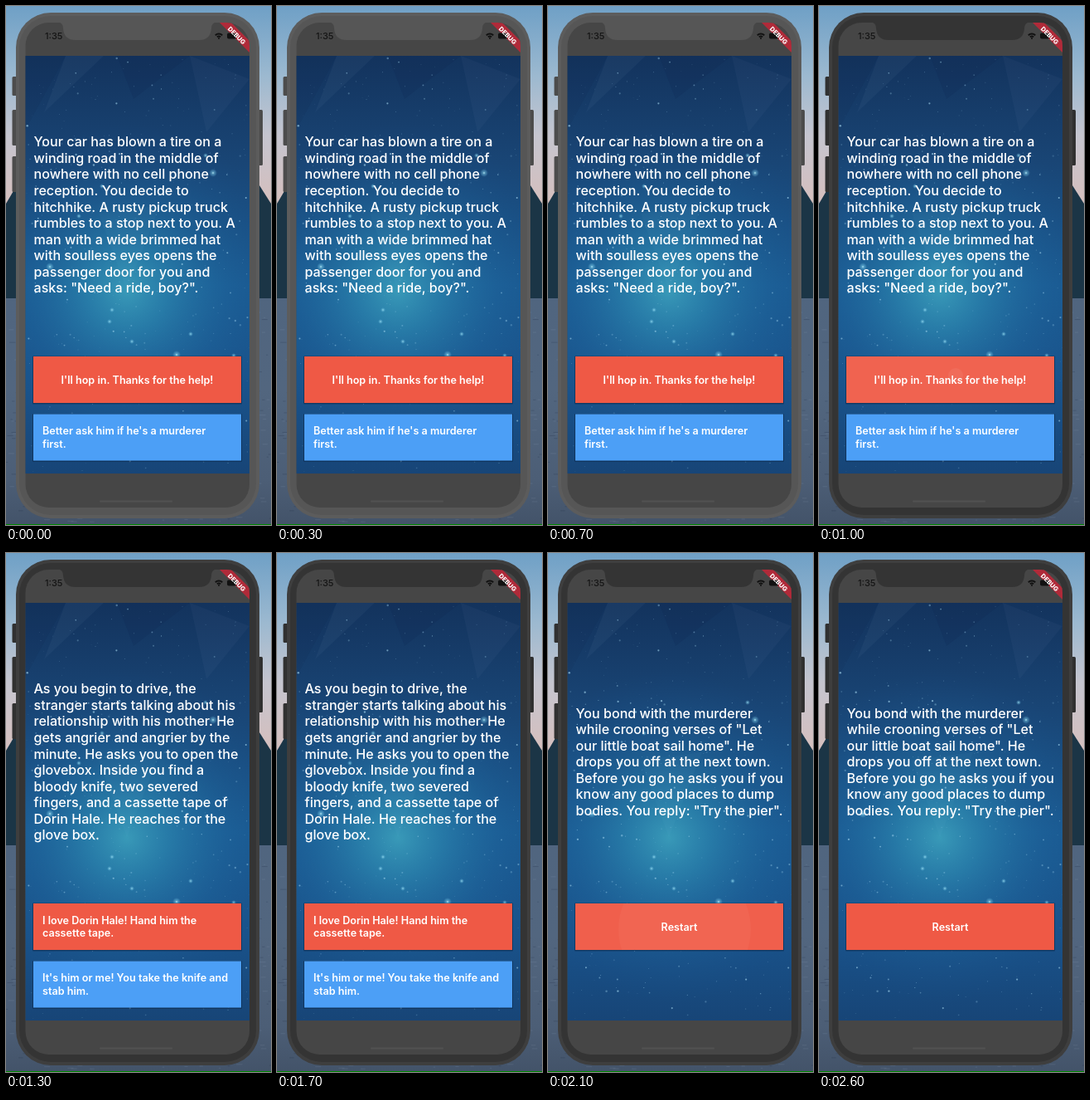
These frames come from a looping animation (320 px wide and 625 px high, 2.7 s). An HTML page with a canvas:

```html
<!DOCTYPE html>
<html lang="en">
<head>
<meta charset="utf-8">
<title>Story choices</title>
<style>
html, body { margin: 0; width: 100%; height: 100%; overflow: hidden; background: #111; }
canvas { display: block; }
</style>
</head>
<body>
<canvas id="stage" width="320" height="625"></canvas>
<script>
const ctx = document.getElementById('stage').getContext('2d');
const LOOP = 2700, STEP = 100;
const FOCUS_AT = 800;
const TAPS = [{ at: 1000, x: 165, y: 445 }, { at: 2000, x: 165, y: 453 }];
const FONT = 'Inter, Roboto, sans-serif';

const SCENES = [
  {
    from: 0,
    story: ['Your car has blown a tire on a', 'winding road in the middle of',
      'nowhere with no cell phone', 'reception. You decide to',
      'hitchhike. A rusty pickup truck', 'rumbles to a stop next to you. A',
      'man with a wide brimmed hat', 'with soulless eyes opens the',
      'passenger door for you and', 'asks: "Need a ride, boy?".'],
    choices: [["I'll hop in. Thanks for the help!"],
      ["Better ask him if he's a murderer", 'first.']]
  },
  {
    from: 1100,
    story: ['As you begin to drive, the', 'stranger starts talking about his',
      'relationship with his mother. He', 'gets angrier and angrier by the',
      'minute. He asks you to open the', 'glovebox. Inside you find a',
      'bloody knife, two severed', 'fingers, and a cassette tape of',
      'Dorin Hale. He reaches for the', 'glove box.'],
    choices: [['I love Dorin Hale! Hand him the', 'cassette tape.'],
      ["It's him or me! You take the knife and", 'stab him.']]
  },
  {
    from: 2100,
    story: ['You bond with the murderer', 'while crooning verses of "Let',
      'our little boat sail home". He', 'drops you off at the next town.',
      'Before you go he asks you if you', 'know any good places to dump',
      'bodies. You reply: "Try the pier".'],
    choices: [['Restart']]
  }
];

const BUTTONS = [
  { y: 422, h: 56, color: '#ef5945' },
  { y: 491.5, h: 56, color: '#4c9ff6' }
];

function seeded(seed) {
  return () => {
    seed = (seed * 1664525 + 1013904223) >>> 0;
    return seed / 4294967296;
  };
}

function fillRect(g, color, x, y, w, h) {
  g.fillStyle = color;
  g.fillRect(x, y, w, h);
}

function fillRound(g, color, x, y, w, h, r) {
  g.fillStyle = color;
  g.beginPath();
  g.roundRect(x, y, w, h, r);
  g.fill();
}

function polygon(g, color, ...points) {
  g.fillStyle = color;
  g.beginPath();
  points.forEach(([x, y]) => g.lineTo(x, y));
  g.fill();
}

function disc(g, color, x, y, r) {
  g.fillStyle = color;
  g.beginPath();
  g.arc(x, y, r, 0, Math.PI * 2);
  g.fill();
}

function withStops(gradient, ...stops) {
  stops.forEach(([at, color]) => gradient.addColorStop(at, color));
  return gradient;
}

function label(g, text, x, y, font, align = 'left', color = '#fff') {
  g.font = `${font} ${FONT}`;
  g.textAlign = align;
  g.textBaseline = 'alphabetic';
  g.fillStyle = color;
  g.fillText(text, x, y);
}

function drawDesktop(g) {
  fillRect(g, withStops(g.createLinearGradient(0, 0, 0, 240),
    [0, '#6fa0c6'], [0.35, '#9cb9d0'], [0.65, '#c5c5cf'], [1, '#d6bfbd']), 0, 0, 320, 240);
  polygon(g, '#1b3546', [0, 238], [13, 216], [306, 216], [320, 238], [320, 354], [0, 354]);
  fillRect(g, withStops(g.createLinearGradient(0, 352, 0, 625),
    [0, '#50657f'], [0.4, '#52667f'], [0.8, '#4c5e76'], [1, '#435369']), 0, 352, 320, 273);
  const rand = seeded(9);
  for (let i = 0; i < 420; i++) {
    const y = 356 + rand() * 266;
    fillRect(g, rand() < 0.5 ? 'rgba(20,32,50,.18)' : 'rgba(170,190,215,.12)',
      rand() * 320, y, 2 + rand() * 6, 1);
  }
  fillRect(g, '#008700', 0, 624, 320, 1);
}

function drawSpace(g) {
  g.save();
  g.beginPath();
  g.rect(23.5, 60, 270.5, 503);
  g.clip();
  fillRect(g, withStops(g.createLinearGradient(0, 60, 0, 563),
    [0, '#13335d'], [0.25, '#194575'], [0.55, '#1a5a92'], [0.8, '#19528a'], [1, '#174577']), 23, 60, 272, 503);
  fillRect(g, withStops(g.createRadialGradient(146, 343, 0, 146, 343, 200),
    [0, 'rgba(60,160,188,.9)'], [0.25, 'rgba(45,138,178,.68)'], [0.6, 'rgba(33,108,162,.32)'],
    [1, 'rgba(24,80,140,0)']), 23, 60, 272, 503);

  polygon(g, 'rgba(130,160,195,.06)', [72, 60], [118, 60], [46, 128]);
  polygon(g, 'rgba(10,30,70,.12)', [134, 60], [222, 60], [154, 112]);
  polygon(g, 'rgba(130,160,195,.05)', [222, 60], [294, 88], [242, 152]);
  polygon(g, 'rgba(10,30,70,.1)', [23, 60], [72, 60], [23, 150]);
  polygon(g, 'rgba(120,190,220,.04)', [146, 343], [112, 250], [186, 240]);

  const rand = seeded(41);
  for (let i = 0; i < 380; i++) {
    const x = 24 + rand() * 270, y = 61 + rand() * 500;
    disc(g, `rgba(165,215,240,${0.15 + rand() * 0.5})`, x, y, 0.35 + rand() ** 3 * 0.9);
  }
  const bright = [[250, 201], [53, 314], [206, 420], [223, 395], [128, 366], [116, 217],
    [88, 253], [125, 380], [152, 404], [275, 421], [241, 180]];
  bright.forEach(([x, y], i) => {
    const r = i < 3 ? 5 : 3;
    disc(g, withStops(g.createRadialGradient(x, y, 0, x, y, r),
      [0, 'rgba(205,245,255,.95)'], [0.3, 'rgba(135,215,240,.5)'], [1, 'rgba(120,200,235,0)']), x, y, r);
  });
  g.restore();
}

function drawStatusBar(g) {
  label(g, '1:35', 47, 40, '500 11px', 'left', '#151515');
  g.strokeStyle = '#111';
  g.lineWidth = 1.8;
  for (const r of [3, 6]) {
    g.beginPath();
    g.arc(257, 39.5, r, -Math.PI * 0.75, -Math.PI * 0.25);
    g.stroke();
  }
  disc(g, '#111', 257, 39, 1);

  g.save();
  g.beginPath();
  g.roundRect(23.5, 20, 270.5, 584, 28);
  g.clip();
  polygon(g, '#b02a39', [257, 19], [271, 19], [295, 43], [295, 57]);
  fillRound(g, '#111', 267, 32.5, 11, 7, 2);
  g.translate(278.5, 35.5);
  g.rotate(Math.PI / 4);
  label(g, 'DEBUG', 0, 2.7, '800 7.6px', 'center');
  g.restore();
}

function drawPhone(g, focused) {
  const bezel = focused ? '#343434' : '#565656';
  const side = focused ? '#303030' : '#4c4c4c';
  [[85, 23], [125, 43], [181, 43]].forEach(([y, h]) => fillRound(g, side, 7.5, y, 6, h, 1.5));
  fillRound(g, side, 304, 125, 6, 67, 1.5);
  fillRound(g, focused ? '#3e3e3e' : '#5c5c5c', 12, 8, 294, 609, 42);
  fillRound(g, bezel, 16, 12, 286, 601, 38);
  fillRound(g, '#464646', 23.5, 20, 270.5, 584, 28);

  g.fillStyle = bezel;
  g.beginPath();
  g.moveTo(62, 19);
  g.quadraticCurveTo(69, 20, 69, 27);
  g.quadraticCurveTo(70, 41, 84, 41);
  g.lineTo(233, 41);
  g.quadraticCurveTo(247, 41, 248, 27);
  g.quadraticCurveTo(248, 20, 255, 19);
  g.fill();

  drawSpace(g);
  drawStatusBar(g);
  fillRound(g, '#525252', 113, 595.5, 88, 2, 1);
}

function makeBackdrop(focused) {
  const layer = document.createElement('canvas');
  layer.width = 320;
  layer.height = 625;
  const g = layer.getContext('2d');
  drawDesktop(g);
  drawPhone(g, focused);
  return layer;
}

const backdrops = [makeBackdrop(false), makeBackdrop(true)];

function drawRipple(time, button) {
  const tap = TAPS.find(({ at }) => time >= at && time < at + 300);
  if (!tap) return;
  const age = (time - tap.at) / STEP;
  const alpha = [0.06, 0.035, 0.015][age];
  ctx.save();
  ctx.beginPath();
  ctx.rect(33, button.y, 251, button.h);
  ctx.clip();
  fillRect(ctx, `rgba(255,255,255,${alpha})`, 33, button.y, 251, button.h);
  disc(ctx, `rgba(255,255,255,${alpha})`, tap.x, tap.y, [9, 80, 125][age]);
  ctx.restore();
}

function drawButton(lines, index, time) {
  const button = BUTTONS[index];
  fillRound(ctx, 'rgba(10,35,65,.5)', 32, button.y - 0.5, 253, button.h + 2, 1);
  fillRect(ctx, button.color, 33, button.y, 251, button.h);
  if (index === 0) drawRipple(time, button);

  const middle = button.y + button.h / 2 + 4.6;
  const single = lines.length === 1;
  lines.forEach((line, i) => label(ctx, line, single ? 158.5 : 44,
    middle + (i - (lines.length - 1) / 2) * 15.6, '600 12.6px', single ? 'center' : 'left'));
}

function draw(time) {
  ctx.drawImage(backdrops[time >= FOCUS_AT ? 1 : 0], 0, 0);
  const scene = SCENES.findLast(({ from }) => time >= from);
  const top = 257.3 - (scene.story.length - 1) / 2 * 19.55;
  scene.story.forEach((line, i) => label(ctx, line, 33.5, top + i * 19.55, '450 16.1px'));
  scene.choices.forEach((lines, i) => drawButton(lines, i, time));
}

const start = performance.now();
function tick() {
  const elapsed = (performance.now() - start) % LOOP;
  draw(Math.floor(elapsed / STEP) * STEP);
  requestAnimationFrame(tick);
}
tick();
</script>
</body>
</html>
```
